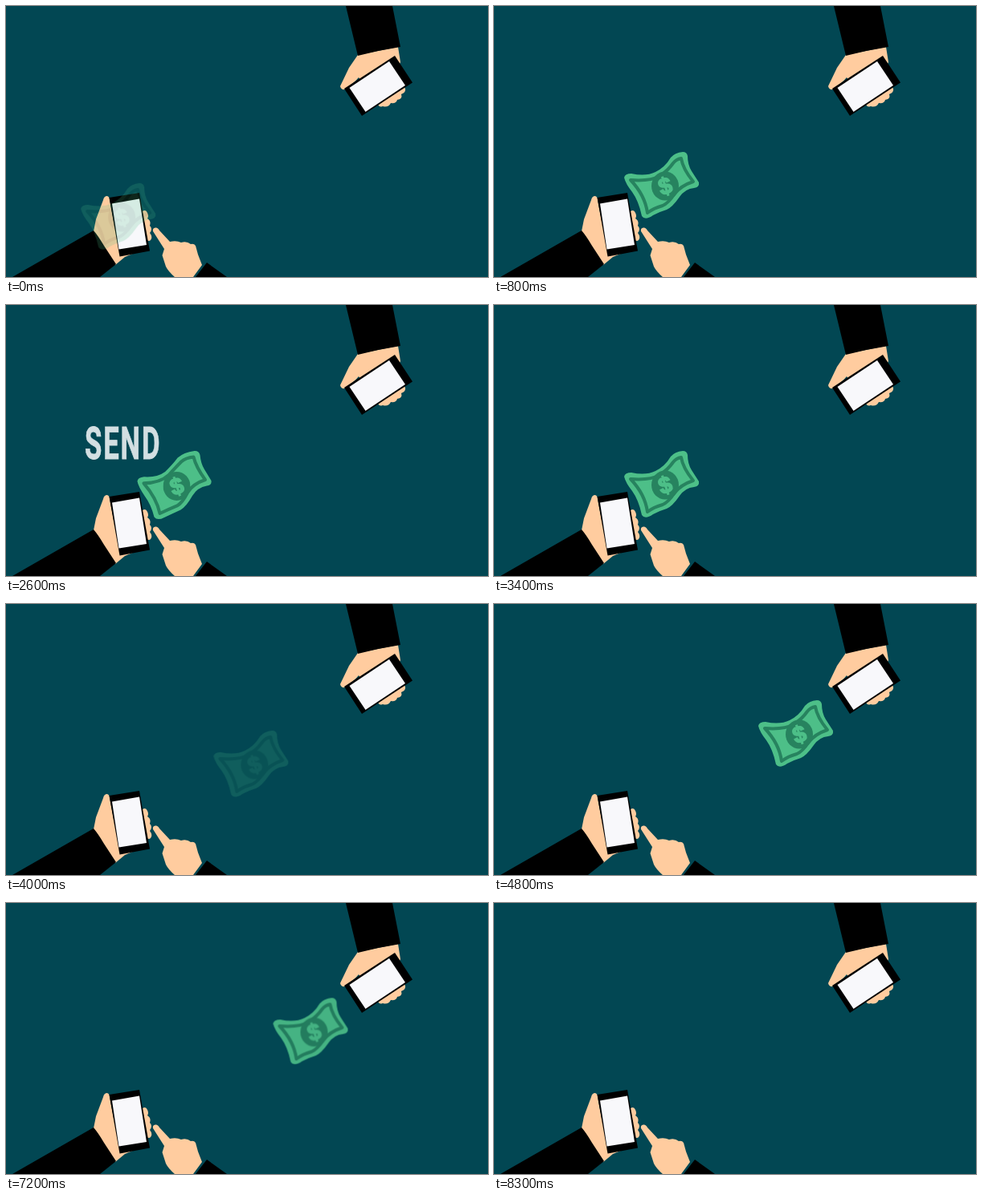
These frames come from a looping animation (600x338 px, 8.4 s). An HTML page:

```html
<!DOCTYPE html>
<html lang="en">
<head>
<meta charset="utf-8">
<title>Send and receive</title>
<style>
  html, body { margin: 0; width: 100%; height: 100%; overflow: hidden; background: #024753; }
  svg { display: block; width: 100%; height: 100%; }
  .skin { fill: #ffcc9f; }
  .screen { fill: #f8f8fb; }

  .bill {
    --paper: path("M-47 -9Q-46 -14 -38 -14Q-20 -10 -8 -16Q4 -22 11 -34Q16 -40 26 -41Q31 -41 32 -36Q32 -25 37 -17L46 -3Q47 3 40 4Q29 5 22 15Q13 28 6 31Q-4 34 -11 38Q-21 45 -25 39Q-29 20 -37 9Q-45 -1 -47 -9Z");
    --paper-waved: path("M-44 3Q-44 -1 -36 -3Q-22 -5 -14 -14Q-7 -27 -2 -31Q8 -38 25 -41Q31 -42 33 -36Q35 -26 39 -19L47 -5Q48 0 42 1Q30 4 24 15Q18 29 11 34Q2 40 -13 46Q-20 48 -24 44Q-28 32 -35 23Q-44 8 -44 3Z");
    --frame: path("M-39 -6Q-15 -4 -3 -11Q7 -17 14 -27Q18 -32 24 -33Q26 -20 39 -4Q24 1 16 11Q8 23 1 26Q-10 29 -18 35Q-21 13 -39 -6Z");
    --frame-waved: path("M-36 5Q-19 2 -10 -11Q-2 -25 4 -28Q11 -33 25 -34Q29 -22 39 -6Q23 -1 18 11Q13 25 7 29Q-3 35 -17 39Q-22 23 -36 5Z");
    animation: travel 8.4s linear infinite, fade 8.4s linear infinite;
  }
  .paper { --rest: var(--paper); --waved: var(--paper-waved); fill: #4dbf88; }
  .frame { --rest: var(--frame); --waved: var(--frame-waved); fill: none; stroke: #27835f; stroke-width: 4; stroke-linejoin: round; }
  .paper, .frame { d: var(--rest); animation: wave 8.4s ease-in-out infinite; }
  .seal { fill: #27835f; animation: shift 8.4s ease-in-out infinite; }
  .dollar {
    font: bold 29px "Liberation Sans", Arial, sans-serif; text-anchor: middle;
    fill: #4dbf88; stroke: #4dbf88; stroke-width: 1.5;
  }

  .word {
    font: bold 55.5px Roboto, sans-serif; letter-spacing: 3px;
    fill: #d3dfe2; stroke: #d3dfe2; stroke-width: .8;
  }
  .send { animation: send 8.4s linear infinite; }
  .receive { animation: receive 8.4s linear infinite; }

  @keyframes travel {
    0% { transform: translate(140px, 262px); animation-timing-function: cubic-bezier(.25, .5, .35, 1); }
    9.52%, 41.07% { transform: translate(209px, 223px); animation-timing-function: ease-in-out; }
    47.6% { transform: translate(287px, 193px); animation-timing-function: step-end; }
    47.61% { transform: translate(305px, 199px); animation-timing-function: cubic-bezier(.25, .5, .35, 1); }
    57.14%, 84.52% { transform: translate(376px, 161px); animation-timing-function: ease-in-out; }
    91.67%, 100% { transform: translate(436px, 133px); }
  }
  @keyframes fade {
    0% { opacity: .2; }
    4.76%, 41.67% { opacity: 1; }
    47.38%, 47.6% { opacity: 0; }
    47.61% { opacity: .2; }
    52.38%, 85.12% { opacity: 1; }
    91.67%, 100% { opacity: 0; }
  }
  @keyframes wave {
    0%, 18.5%, 35%, 65.48%, 84.5%, 100% { d: var(--rest); }
    26.8%, 75% { d: var(--waved); }
  }
  @keyframes shift {
    0%, 18.5%, 35%, 65.48%, 84.5%, 100% { transform: translate(4px, 1.5px); }
    26.8%, 75% { transform: translate(3px, 4.5px); }
  }
  @keyframes send {
    0%, 17.86% { opacity: 0; }
    21.43%, 36.9% { opacity: 1; }
    40.48%, 100% { opacity: 0; }
  }
  @keyframes receive {
    0%, 66.07% { opacity: 0; }
    69.64%, 79.76% { opacity: 1; }
    83.93%, 100% { opacity: 0; }
  }
</style>
</head>
<body>
<svg viewBox="0 0 600 338" preserveAspectRatio="none">
  <rect width="600" height="338" fill="#024753"/>

  <!-- Sender: hand holding the phone -->
  <path class="skin" d="M121 242Q122 237 126 237Q129 238 129 242L134 268L170 256Q174 253 176 258Q178 262 176 265Q181 268 179 274Q183 278 179 283Q183 288 180 292Q178 294 175 292L160 308L148 313L136 323L109 281L112 266Z"/>
  <path d="M8 338L109 280Q115 287 122 299L137 322L117 338Z"/>
  <path d="M128.500 239L166 233L179 305.500L141.500 312.500Z"/>
  <path class="screen" d="M132 246.500L166 240.500L175 298L140.500 303.500Z"/>

  <!-- Sender: pointing hand -->
  <path class="skin" d="M183 281Q182 277 186 276.500Q189 276 191 280L204 294Q212 292 218 295Q225 293 230 297Q234 296 236 299L239 310L244 323L233 338H210Q202 331 199 325L194.500 311L197 303Z"/>
  <path d="M250 320L275 338H236Z"/>

  <!-- Receiver -->
  <path class="skin" d="M438 61L488 51L491 70L484 85L497 103Q498 108 492 110Q494 116 487 117Q486 122 479 121Q476 127 469 125Q464 127 463 122L450 95L438 91L422 104Q417 105 416 100L427 77Z"/>
  <path d="M423 0H481L491 51Q465 55 438 62Z"/>
  <path d="M434 95L439 89L441 92Z" fill="#024753"/>
  <path d="M421 103L484 62L506 95.500L443 137Z"/>
  <path class="screen" d="M427.500 102L477 69L497 99L447.500 132Z"/>

  <g class="bill">
    <path class="paper"/>
    <path class="frame"/>
    <g class="seal">
      <ellipse rx="17" ry="18"/>
      <text class="dollar" transform="rotate(-18)" y="10">$</text>
    </g>
  </g>

  <g class="send"><text class="word" transform="translate(98 192) scale(.625 1)">SEND</text></g>
  <g class="receive"><text class="word" transform="translate(401.800 232) scale(.625 1)">RECEIVE</text></g>
</svg>
</body>
</html>
```
